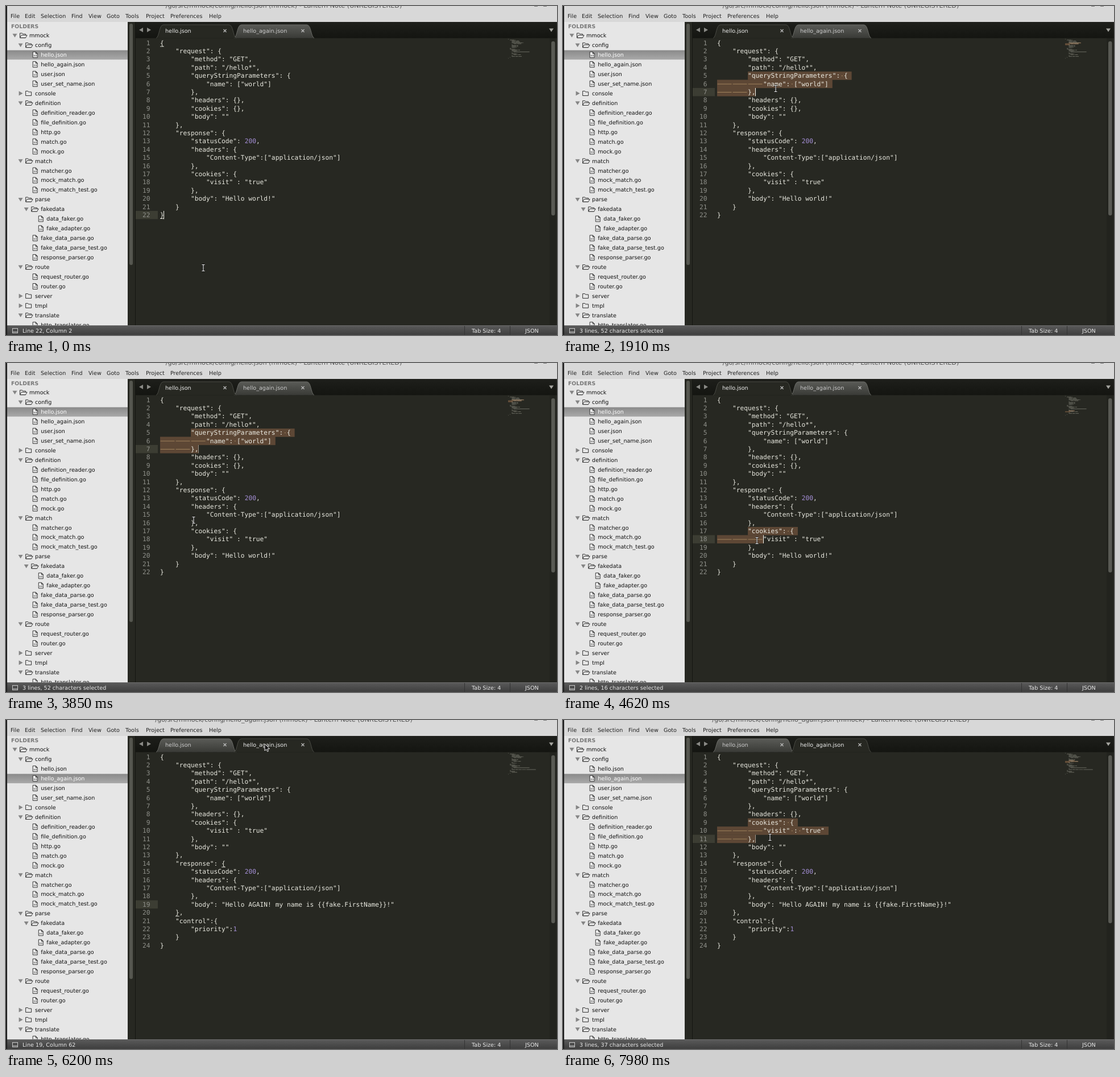
These frames come from a looping animation (969 by 578 pixels, 8000 ms). An HTML page with a canvas:

```html
<!DOCTYPE html>
<html lang="en">
<head>
<meta charset="utf-8">
<title>Editor</title>
<style>
html, body { margin: 0; width: 100%; height: 100%; overflow: hidden; background: #272822; }
canvas { display: block; }
</style>
</head>
<body>
<canvas id="stage" width="969" height="578"></canvas>
<script>
const LOOP = 8000, X0 = 271, CW = 6.76, Y0 = 57.6, LH = 14.4;
const UI = '9.6px "DejaVu Sans", sans-serif';
const MONO = '11.23px "DejaVu Sans Mono", monospace';
const c = document.getElementById('stage').getContext('2d');
c.textRendering = 'geometricPrecision';

const REQUEST = `{
    "request": {
        "method": "GET",
        "path": "/hello*",
        "queryStringParameters": {
            "name": ["world"]
        },
        "headers": {},
`;
const COOKIES = `        "cookies": {
            "visit" : "true"
        },
`;
const RESPONSE = `        "body": ""
    },
    "response": {
        "statusCode": 200,
        "headers": {
            "Content-Type":["application/json"]
        },
`;
const docs = [
  { file: 'hello.json', thumb: 306, caret: [21, 1], pair: [[0, 0], [21, 0]],
    text: REQUEST + '        "cookies": {},\n' + RESPONSE + COOKIES +
      '        "body": "Hello world!"\n    }\n}' },
  { file: 'hello_again.json', thumb: 295, caret: [18, 61], pair: [[13, 16], [19, 4]],
    text: REQUEST + COOKIES + RESPONSE +
      '        "body": "Hello AGAIN! my name is {{fake.FirstName}}!"\n    },\n' +
      '    "control":{\n        "priority":1\n    }\n}' }
];
docs.forEach(d => d.rows = d.text.split('\n'));

// depth, kind (o open folder, c closed folder, f file), label
const tree = `0o mmock
1o config
2f hello.json
2f hello_again.json
2f user.json
2f user_set_name.json
1c console
1o definition
2f definition_reader.go
2f file_definition.go
2f http.go
2f match.go
2f mock.go
1o match
2f matcher.go
2f mock_match.go
2f mock_match_test.go
1o parse
2o fakedata
3f data_faker.go
3f fake_adapter.go
2f fake_data_parse.go
2f fake_data_parse_test.go
2f response_parser.go
1o route
2f request_router.go
2f router.go
1c server
1c tmpl
1o translate
2f http_translator.go`.split('\n').map(s => ({ depth: +s[0], kind: s[1], name: s.slice(3) }));

// pointer path: time, x, y
const path = [
  [0, 347, 460], [440, 347, 460], [1160, 324, 120], [1270, 324, 120], [1910, 374, 145],
  [2050, 378, 147], [2490, 378, 147], [3050, 311, 331], [3290, 322, 307], [3850, 330, 276],
  [4130, 323, 295], [4200, 323, 295], [4620, 341, 312], [4930, 440, 337], [5040, 482, 340],
  [5590, 447, 166], [5750, 449, 83], [5930, 455, 42], [6370, 455, 42], [6880, 320, 187],
  [7070, 320, 187], [7150, 321, 182], [7290, 321, 182], [7610, 364, 206], [8000, 364, 206]
];
const drags = [[1270, 2050, 0], [4200, 5040, 0], [7290, 7610, 1]];
const SWITCH = 5960;
// caret fades off, on, off ... starting from on
const blinks = [90, 440, 2170, 2490, 2850, 3190, 3530, 3820, 5140, 5470, 5810, 5960,
  6130, 6390, 6750, 7290, 7770, 7945];

function slope(i, k) {
  const s = j => path[j] && path[j + 1]
    ? (path[j + 1][k] - path[j][k]) / (path[j + 1][0] - path[j][0]) : 0;
  const a = s(i - 1), b = s(i);
  return a * b > 0 ? 2 * a * b / (a + b) : 0;
}

function mouseAt(t) {
  let i = 0;
  while (i < path.length - 2 && path[i + 1][0] <= t) i++;
  const a = path[i], b = path[i + 1], d = b[0] - a[0], u = (t - a[0]) / d;
  return [1, 2].map(k => {
    const e = u * u * (3 - 2 * u);
    return a[k] + (b[k] - a[k]) * e + d * u * (1 - u) *
      (slope(i, k) * (1 - u) - slope(i + 1, k) * u);
  });
}

const indent = row => row.search(/\S/);

function hit(rows, [x, y]) {
  const r = Math.max(0, Math.min(rows.length - 1, Math.floor((y - Y0) / LH)));
  let col = (x - X0) / CW;
  col = col < indent(rows[r]) ? Math.round(col / 4) * 4 : Math.round(col);
  return [r, Math.max(0, Math.min(rows[r].length, col))];
}

function caretAlpha(t) {
  let on = 1, v = 1;
  for (const b of blinks) {
    if (t < b) break;
    on = 1 - on;
    const p = Math.min(1, (t - b) / 70);
    v = on ? p : 1 - p;
  }
  return v;
}

function stateAt(t) {
  const id = t < SWITCH ? 0 : 1, doc = docs[id];
  const drag = drags.filter(d => d[0] <= t && d[2] === id).pop();
  const s = { id, doc, mouse: mouseAt(t), blink: caretAlpha(t), dragged: !!drag };
  if (drag) {
    s.from = hit(doc.rows, mouseAt(drag[0]));
    s.caret = hit(doc.rows, mouseAt(Math.min(t, drag[1])));
  } else {
    s.from = s.caret = doc.caret;
  }
  const [a, b] = [s.from, s.caret].sort((p, q) => p[0] - q[0] || p[1] - q[1]);
  s.spans = [];
  if (a[0] !== b[0] || a[1] !== b[1]) {
    for (let r = a[0]; r <= b[0]; r++) {
      s.spans.push({ r, a: r === a[0] ? a[1] : 0, b: r === b[0] ? b[1] : doc.rows[r].length, nl: r < b[0] });
    }
  }
  return s;
}

function statusText(s) {
  if (!s.spans.length) return `Line ${s.caret[0] + 1}, Column ${s.caret[1] + 1}`;
  let n = 0;
  for (const p of s.spans) {
    const ind = indent(s.doc.rows[p.r]);
    const chars = col => col <= ind ? col / 4 : ind / 4 + col - ind;
    n += chars(p.b) - chars(p.a) + (p.nl ? 1 : 0);
  }
  const lines = s.spans.length;
  return (lines > 1 ? lines + ' lines, ' : '') + n + ' characters selected';
}

function box(x, y, w, h, fill) { c.fillStyle = fill; c.fillRect(x, y, w, h); }
function pill(x, y, w, h, fill) {
  c.fillStyle = fill;
  c.beginPath(); c.roundRect(x, y, w, h, w / 2); c.fill();
}
function label(s, x, y, fill, font = UI, align = 'left') {
  c.font = font; c.textAlign = align; c.fillStyle = fill;
  c.fillText(s, x, y);
}
function shape(pts, fill, stroke) {
  c.beginPath();
  pts.forEach(([x, y], i) => i ? c.lineTo(x, y) : c.moveTo(x, y));
  c.closePath();
  if (fill) { c.fillStyle = fill; c.fill(); }
  if (stroke) { c.strokeStyle = stroke; c.stroke(); }
}
function fade(y, h, top, bottom) {
  const g = c.createLinearGradient(0, y, 0, y + h);
  g.addColorStop(0, top); g.addColorStop(1, bottom);
  return g;
}

function drawHeader(s) {
  box(0, 0, 969, 28, '#d8d8d8');
  label(`/go/src/mmock/config/${s.doc.file} (mmock) - Lantern Note (UNREGISTERED)`, 488.5, 3,
    '#555', '11.2px "DejaVu Sans", sans-serif', 'center');
  box(929, 0, 6, 1, '#777'); box(945, 0, 6, 1, '#777');
  [['File', 8], ['Edit', 33], ['Selection', 61], ['Find', 115], ['View', 145], ['Goto', 177],
    ['Tools', 210], ['Project', 246], ['Preferences', 289], ['Help', 357]]
    .forEach(([w, x]) => label(w, x, 20.5, '#222'));
}

function folderIcon(x, y, open) {
  c.lineWidth = 1;
  shape([[x, y + 4], [x, y - 4], [x + 4, y - 4], [x + 5, y - 2.5], [x + 10, y - 2.5], [x + 10, y + 4]], null, '#333');
  if (open) shape([[x, y + 4], [x + 2.5, y - .5], [x + 12.5, y - .5], [x + 10, y + 4]], '#eee', '#333');
}

function fileIcon(x, y) {
  c.lineWidth = 1;
  shape([[x, y - 5], [x + 5, y - 5], [x + 8, y - 2], [x + 8, y + 5], [x, y + 5]], '#f4f4f4', '#333');
  shape([[x + 5, y - 5], [x + 5, y - 2], [x + 8, y - 2]], null, '#333');
  box(x + 2, y, 1.2, 3, '#444'); box(x + 5, y, 1.2, 3, '#444');
}

function drawSidebar(s) {
  box(2, 28, 212, 533, '#e6e6e6');
  label('FOLDERS', 9, 39, '#777', 'bold 9.3px "DejaVu Sans", sans-serif');
  c.save();
  c.beginPath(); c.rect(2, 28, 212, 533); c.clip();
  tree.forEach((n, i) => {
    const y = 51.8 + 16.95 * i, x = 41 + 10.1 * n.depth, on = n.name === s.doc.file;
    if (on) box(2, y - 8, 212, 16.5, fade(y - 8, 16.5, '#8a8a8a', '#a9a9a9'));
    if (n.kind === 'f') fileIcon(x - 14, y);
    else {
      const ax = x - 25.5;
      shape(n.kind === 'o' ? [[ax - 4, y - 3], [ax + 4, y - 3], [ax, y + 3.5]]
        : [[ax - 3, y - 4], [ax + 4, y], [ax - 3, y + 4]], '#858585');
      folderIcon(x - 16.5, y, n.kind === 'o');
    }
    label(n.name, x, y + 3.4, on ? '#fff' : '#111');
  });
  c.restore();
  box(214, 28, 14, 533, '#272822');
  box(227, 28, 1, 533, '#151612');
  pill(217, 31, 6, 424, '#55564f');
}

function tab(x, w, name, active) {
  const top = 33, r = x + w;
  c.beginPath();
  c.moveTo(x, 56.5);
  c.bezierCurveTo(x + 6, 54, x + 5, top, x + 13, top);
  c.lineTo(r - 13, top);
  c.bezierCurveTo(r - 5, top, r - 6, 54, r, 56.5);
  c.fillStyle = active ? '#272822' : fade(33, 23, '#5a5b57', '#3a3b37');
  c.fill();
  c.strokeStyle = active ? '#4a4b45' : '#6a6b66'; c.lineWidth = 1; c.stroke();
  label(name, x + 16, 46.5, active ? '#eee' : '#ccc');
  const cx = r - 20;
  c.strokeStyle = '#bbb'; c.lineWidth = 1.3;
  c.beginPath();
  c.moveTo(cx - 2.5, 41); c.lineTo(cx + 2.5, 46);
  c.moveTo(cx + 2.5, 41); c.lineTo(cx - 2.5, 46);
  c.stroke();
}

function drawTabs(s) {
  box(228, 28, 741, 28.5, fade(28, 28, '#1e1f1b', '#141511'));
  shape([[241, 38], [241, 46], [234, 42]], '#8a8a86');
  shape([[248, 38], [248, 46], [255, 42]], '#8a8a86');
  shape([[955, 39.5], [963, 39.5], [959, 45.5]], '#a5a5a0');
  const tabs = [[264, 141, docs[0].file], [401, 141, docs[1].file]];
  tab(...tabs[1 - s.id], false);
  tab(...tabs[s.id], true);
}

function drawSelection(s) {
  for (const p of s.spans) {
    const y = Y0 + p.r * LH, row = s.doc.rows[p.r], ind = indent(row);
    box(X0 + p.a * CW, y, (p.b - p.a + (p.nl ? 1 : 0)) * CW, LH + .2, '#5d4735');
    for (let k = p.a; k < p.b; k++) {
      const x = X0 + k * CW;
      if (k < ind && k % 4 === 0) box(x + .5, y + 7, 4 * CW - 2, 1, '#a0835c');
      else if (k >= ind && row[k] === ' ') box(x + 2.8, y + 6.8, 1.3, 1.3, '#b0936c');
    }
  }
}

function drawMinimap(s) {
  const mx = 883, mw = .8, mh = 1.6;
  for (const p of s.spans) {
    box(mx + p.a * mw, Y0 + p.r * mh, (p.b - p.a + (p.nl ? 1 : 0)) * mw, mh, '#6b533c');
  }
  s.doc.rows.forEach((row, r) => {
    for (const m of row.matchAll(/\S+/g)) {
      box(mx + m.index * mw, Y0 + r * mh + .2, m[0].length * mw, .9, 'rgba(225,225,210,.38)');
    }
  });
}

function drawEditor(s) {
  box(228, 56, 741, 505, '#272822');
  const cy = Y0 + s.caret[0] * LH;
  box(228, cy, 39, LH, '#3c3d33');
  drawSelection(s);
  s.doc.rows.forEach((row, r) => {
    const y = Y0 + r * LH + 10.9;
    label(r + 1, 253.5, y, '#8f908a', MONO, 'right');
    let col = 0;
    for (const part of row.split(/(\d+)/)) {
      if (part.trim()) label(part, X0 + col * CW, y, /^\d/.test(part) ? '#a48fd6' : '#e8e8df', MONO);
      col += part.length;
    }
  });
  if (!s.dragged) {
    s.doc.pair.forEach(([r, k]) => box(X0 + k * CW, Y0 + r * LH + 13, CW, 1, '#d8d8cf'));
  }
  c.globalAlpha = s.blink;
  box(Math.floor(X0 + s.caret[1] * CW), cy, 1, LH, '#f8f8f0');
  c.globalAlpha = 1;
  drawMinimap(s);
  box(956, 56, 13, 505, '#22231e');
  pill(959, 62, 6.5, s.doc.thumb, '#595a54');
}

function drawStatus(s) {
  box(0, 561, 969, 17, fade(561, 17, '#5b5b5b', '#3e3e3e'));
  box(0, 561, 969, 1, '#6c6c6c');
  c.strokeStyle = '#c8c8c8'; c.lineWidth = 1;
  c.strokeRect(11.5, 566.5, 9, 8);
  box(12, 572, 8, 1, '#c8c8c8');
  label(statusText(s), 29, 574, '#e8e8e8');
  box(806, 562, 1, 16, '#333'); box(886, 562, 1, 16, '#333');
  label('Tab Size: 4', 819, 574, '#e8e8e8');
  label('JSON', 913, 574, '#e8e8e8');
}

function drawPointer([x, y]) {
  if (y < 56) {
    c.lineWidth = 1;
    shape([[0, 0], [0, 12], [2.8, 9.5], [4.8, 13.5], [6.6, 12.6], [4.8, 8.8], [8.5, 8.6]]
      .map(([a, b]) => [x + a, y + b]), '#111', '#eee');
    return;
  }
  const beam = () => {
    c.beginPath();
    c.moveTo(x - 2.5, y - 5.5); c.lineTo(x + 2.5, y - 5.5);
    c.moveTo(x, y - 5.5); c.lineTo(x, y + 5.5);
    c.moveTo(x - 2.5, y + 5.5); c.lineTo(x + 2.5, y + 5.5);
    c.stroke();
  };
  c.strokeStyle = '#111'; c.lineWidth = 2.4; beam();
  c.strokeStyle = '#f2f2f2'; c.lineWidth = 1.1; beam();
}

function frame(now) {
  const s = stateAt(now % LOOP);
  drawHeader(s);
  drawSidebar(s);
  drawEditor(s);
  drawTabs(s);
  drawStatus(s);
  box(0, 0, 2, 578, '#1c1c1c');
  drawPointer(s.mouse);
  requestAnimationFrame(frame);
}
requestAnimationFrame(frame);
</script>
</body>
</html>
```
